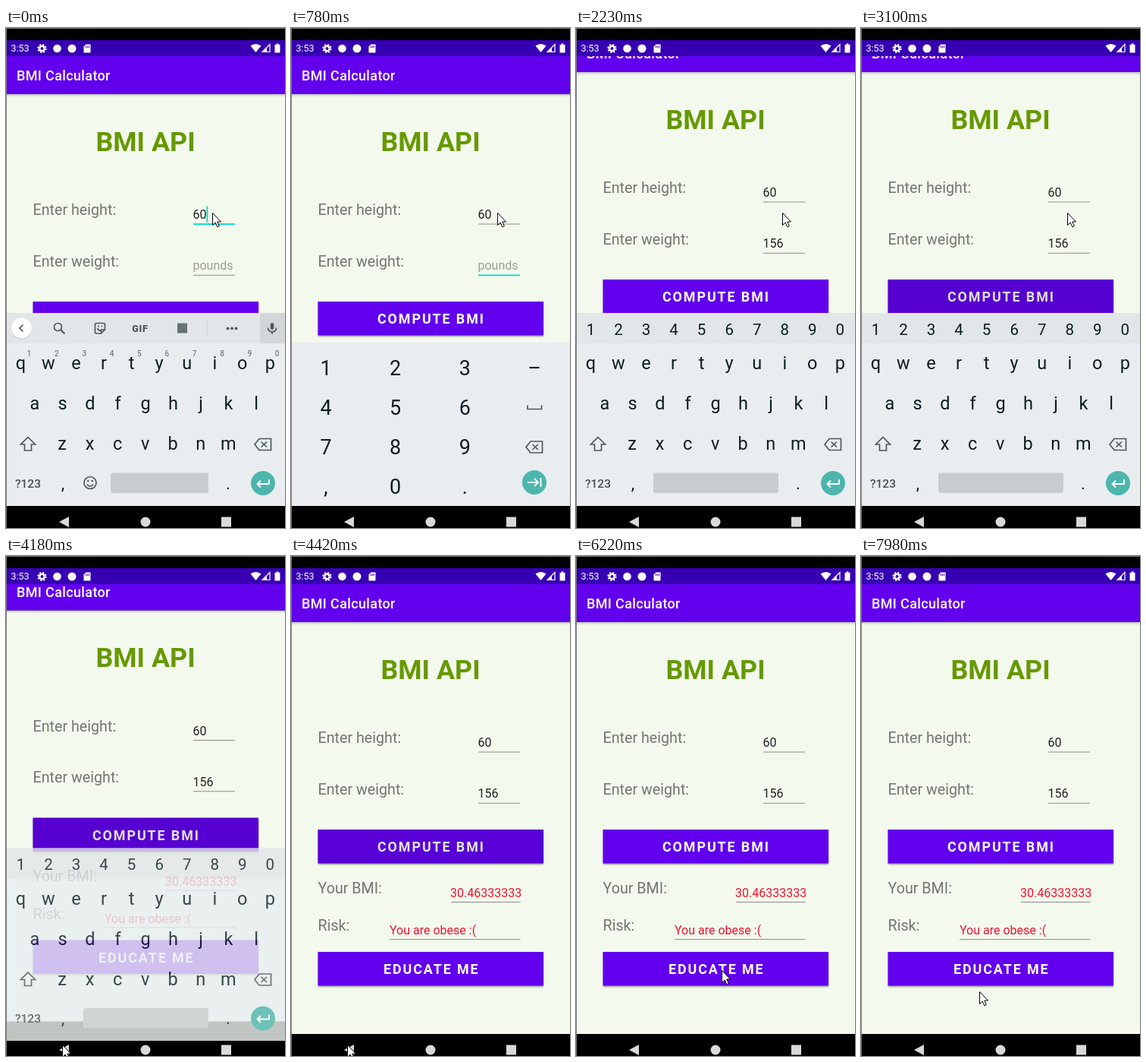
An HTML page for the animation above (8000 ms loop, 368 px wide and 658 px high).

```html
<!DOCTYPE html>
<html lang="en">
<head>
<meta charset="utf-8">
<title>BMI Calculator</title>
<style>
  html, body { margin: 0; width: 100%; height: 100%; overflow: hidden; background: #000; }
  svg { display: block; width: 100vw; height: 100vh; font-family: Roboto, sans-serif; }
  .label { font-size: 19.7px; fill: #757575; }
  .value { font-size: 16px; fill: #222; }
  .red { fill: #ee1530; }
  .button { font-size: 17.9px; font-weight: 700; letter-spacing: 1.9px; fill: #fff; }
  .keys { fill: #0c1d24; text-anchor: middle; }
  .icon { fill: none; stroke: #4d585d; stroke-width: 1.7; }
</style>
</head>
<body>
<svg id="stage" viewBox="0 0 368 658"></svg>
<script>
const text = (x, y, content, attrs = '') => `<text x="${x}" y="${y}" ${attrs}>${content}</text>`;
const rect = (x, y, w, h, fill, attrs = '') =>
  `<rect x="${x}" y="${y}" width="${w}" height="${h}" fill="${fill}" ${attrs}/>`;
const circle = (x, y, r, fill, attrs = '') =>
  `<circle cx="${x}" cy="${y}" r="${r}" fill="${fill}" ${attrs}/>`;
const path = (d, attrs = '') => `<path d="${d}" ${attrs}/>`;
const row = (chars, x, step, y, size) =>
  [...chars].map((c, i) => text(x + step * i, y, c, `font-size="${size}"`)).join('');

const field = (id, y) => `
  ${text(246.5, y, '', `id="${id}Text" class="value"`)}
  ${rect(247, y + 6.5, 55, 1, '#8b8e88', `id="${id}Line"`)}
  ${rect(264, y - 16.5, 1.8, 21, '#03dac5', `id="${id}Caret"`)}`;

const button = (y, label, x, id) => `
  ${rect(36, y + 1.5, 297, 44.5, '#000', `id="${id}Shadow" opacity=".4" filter="url(#blur)"`)}
  ${rect(35.5, y, 297.5, 44.5, '#6200ee')}
  ${text(x, y + 29.3, label, `class="button" id="${id}Label"`)}`;

const backspace = (x, y) => `<g class="icon" transform="translate(${x} ${y})">
  ${path('M-11 0L-5-7.5H10.5V7.5H-5Z')}${path('M-2.5-3.5L5 3.5M5-3.5L-2.5 3.5')}</g>`;

const actionKey = (x, y, arrow) => `<g transform="translate(${x} ${y})">
  ${circle(0, 0, 16, '#4db6ac')}${path(arrow, 'fill="none" stroke="#fff" stroke-width="1.9"')}</g>`;

const app = `<g id="app">
  ${rect(0, 87, 368, 600, '#f3f9ed')}
  ${rect(0, 87, 368, 4, 'url(#fade)')}
  ${rect(0, 20, 368, 67, '#6200ee')}
  ${text(14, 69, 'BMI Calculator', 'fill="#fff" font-size="18" font-weight="500" letter-spacing=".35"')}
  ${text(184, 161.5, 'BMI API', 'fill="#669900" font-size="35.8" font-weight="700" text-anchor="middle"')}
  ${text(35.5, 246, 'Enter height:', 'class="label"')}
  ${text(35.5, 313.5, 'Enter weight:', 'class="label"')}
  ${field('height', 251)}
  ${field('weight', 318.3)}
  ${button(360, 'COMPUTE BMI', 114, 'compute')}
  <g clip-path="url(#buttonClip)">${circle(184, 382, 200, '#000', 'id="ripple"')}</g>
  <g id="results">
    ${text(35.5, 443.7, 'Your BMI:', 'class="label"')}
    ${text(35.5, 493, 'Risk:', 'class="label"')}
    ${text(210, 449, '30.46333333', 'class="value red"')}
    ${rect(211, 455, 91.5, 1, '#8b8e88')}
    ${text(130, 498, 'You are obese :(', 'class="value red"')}
    ${rect(130, 504, 172.5, 1, '#8b8e88')}
    ${button(521, 'EDUCATE ME', 122, 'educate')}
  </g>
</g>`;

const toolbar = `<g id="toolbar">
  ${rect(0, 375, 368, 40, '#e2e6e8')}${rect(335, 375, 33, 40, '#d2d6d9')}
  ${circle(20.5, 395.8, 13.7, '#000', 'opacity=".15"')}${circle(20.5, 395, 13.5, '#fff')}
  ${path('M22.5 390.5L18 395L22.5 399.5', 'class="icon"')}
  <g class="icon">
    ${circle(68.5, 393.5, 5, 'none')}${path('M72 397L77.5 402.5', 'stroke-width="2.2"')}
    ${path('M119 388.5H129Q130.500 388.500 130.500 390V397L125.500 402H119Q117.500 402 117.500 400.500V390Q117.500 388.500 119 388.500ZM125.500 402V397H130.500M120.500 395Q122 399 125 398')}
    ${rect(348.8, 388, 4.4, 9, '#4d585d', 'rx="2.2" stroke="none"')}
    ${path('M345.500 394.500Q345.500 399.800 351 399.800T356.500 394.500M351 400V403')}
  </g>
  ${circle(122, 392.5, 1, '#4d585d')}${circle(126.5, 392.5, 1, '#4d585d')}
  ${text(177, 399.500, 'GIF', 'font-size="12.500" font-weight="900" letter-spacing=".8" fill="#4d585d"')}
  ${rect(226, 388.500, 13, 13, '#68737a')}
  ${rect(264.500, 386, 1, 18, '#c8cdd0')}
  ${[292.500, 298, 303.500].map(x => circle(x, 395.300, 1.900, '#4d585d')).join('')}
  <g fill="#59646a">${row('1234567890', 30.500, 36.350, 431.500, 10)}</g>
  <g class="icon" stroke-width="1.500">${circle(111, 598.500, 8, 'none')}
    ${path('M106.800 600.500Q111 606 115.200 600.500')}</g>
  ${circle(108.200, 596, 1.300, '#4d585d')}${circle(113.800, 596, 1.300, '#4d585d')}
</g>`;

const letters = `<g id="letters">
  ${row('qwertyuiop', 19.400, 36.550, 449, 23.500)}
  ${row('asdfghjkl', 38, 36.500, 502, 23.500)}
  ${row('zxcvbnm', 74, 36.550, 555, 23.500)}
  ${path('M29 538.500L38.500 548H33.500V556H24.500V548H19.500Z', 'class="icon"')}
  ${backspace(339, 548)}
  ${text(29, 604.500, '?123', 'font-size="15.500" font-weight="500" fill="#455056"')}
  ${text(75, 606.500, ',', 'font-size="22"')}${text(293, 606.500, '.', 'font-size="22"')}
  ${rect(138, 585.500, 129, 26.500, '#c8cccf', 'id="space" rx="3"')}
  ${actionKey(339, 599, 'M8-5V1H-7M-3-3.500L-7.500 1L-3 5.500')}
</g>`;

const numberPad = `<g id="numberPad">
  ${['123–', '456', '789', ',0.'].map((r, i) => row(r, 46, 91.700, 457 + 52 * i, 27)).join('')}
  ${path('M312 496.500V501.500H330.500V496.500', 'class="icon"')}
  ${backspace(321, 551.500)}
  ${actionKey(321, 598, 'M-9 0H4M0-5L5 0L0 5M8.500-6V6')}
</g>`;

const statusBar = `
  ${rect(0, 0, 368, 16, '#000')}${rect(0, 16, 368, 21, '#3700b3')}
  <g fill="#fff">
    ${text(6.500, 31, '3:53', 'font-size="12.500"')}
    ${circle(47.500, 27, 3.300, 'none', 'stroke="#fff" stroke-width="2.600"')}
    ${circle(47.500, 27, 5.300, 'none', 'stroke="#fff" stroke-width="1.600" stroke-dasharray="2.200 1.960"')}
    ${circle(67.500, 27, 5.300, '#fff')}${circle(87, 27, 5.500, '#fff')}
    ${path('M105.500 21.500H111.500V32.500H102.500V24.500Z')}
    ${path('M105.500 23.500V26M107.500 23.500V26M109.500 23.500V26', 'stroke="#3700b3"')}
    ${path('M322.500 23.500Q329.500 18.500 336.500 23.500L329.500 32Z')}
    ${path('M338 31.500L348 21.500V31.500Z', 'fill="none" stroke="#fff" stroke-width="1.200"')}
    ${path('M338 32L344 26V32Z')}
    ${path('M354.500 22H356.500V20.500H359.500V22H361.500V32.500H354.500Z')}
  </g>`;

const navIcons = `<g fill="#d9d9d9">
  ${path('M70 650L83 643V657Z')}${circle(184, 650, 6.500, '#d9d9d9')}${rect(284, 643.500, 13, 13, '#d9d9d9')}</g>`;

document.getElementById('stage').innerHTML = `
  <defs>
    <filter id="blur" x="-10%" y="-20%" width="120%" height="150%"><feGaussianBlur stdDeviation="1.300"/></filter>
    <linearGradient id="fade" x2="0" y2="1"><stop stop-opacity=".22"/><stop offset="1" stop-opacity="0"/></linearGradient>
    <clipPath id="buttonClip"><rect x="35.500" y="360" width="297.500" height="44.500"/></clipPath>
  </defs>
  ${app}
  <g id="keyboard" class="keys">
    ${rect(0, 375, 368, 254, '#e9edf0', 'id="keyboardBack"')}
    ${rect(0, 603, 368, 26, '#b5b9b9', 'id="strip"')}
    ${toolbar}
    <g id="digits">${rect(0, 375, 368, 40, '#e2e6e8')}${row('1234567890', 19.400, 36.550, 403.500, 20.500)}</g>
    ${letters}${numberPad}
  </g>
  ${rect(0, 629, 368, 40, '#000', 'id="nav"')}
  ${statusBar}${navIcons}
  ${rect(0, 0, 1, 658, '#777')}${rect(0, 0, 368, 1, '#777')}
  ${path('M.500.500V16.500L4.200 13L6.800 18.800L9.300 17.700L6.800 12H11.500Z', 'id="pointer" fill="#fff" stroke="#000"')}`;

// Each step overrides part of the state from its start time on.
const steps = [
  [0, { keys: 'toolbar', focus: 'height', caret: 1, weight: '', scroll: 0, drop: 0, alpha: 1,
        shade: 0, radius: 200, labelColor: '#fff', results: 0, lift: 0 }],
  [120, { focus: 'weight' }],
  [240, { keys: 'numberPad' }],
  [780, { caret: 0 }],
  [900, { caret: 1, weight: '1' }],
  [1020, { weight: '15' }],
  [1300, { weight: '156' }],
  [1710, { caret: 0 }],
  [1990, { focus: '' }],
  [2110, { keys: 'digits', scroll: -15 }],
  [2230, { scroll: -29 }],
  [2600, { shade: .07, radius: 126 }],
  [2740, { radius: 200 }],
  [3100, { shade: .12 }],
  [4050, { results: 1, drop: 2, alpha: .96 }],
  [4180, { scroll: -15.500, drop: 9.500, alpha: .81 }],
  [4300, { scroll: -2, drop: 20, alpha: .2 }],
  [4420, { scroll: 0, drop: 0, alpha: 0, shade: .1 }],
  [4660, { shade: 0, labelColor: '#e8e4f0' }],
  [6070, { labelColor: '#fff', lift: 1 }],
  [6220, { lift: 0 }],
];
const pointerStops = [
  [0, 272, 243], [3240, 245, 350], [3360, 192, 540], [3480, 162, 632],
  [3650, 130, 640], [3770, 95, 643], [3890, 74, 643],
  [4540, 118, 615], [4660, 171, 580], [4810, 183, 558], [4930, 192, 540],
  [5050, 197, 530], [5310, 194, 542], [5480, 192, 545], [7860, 167, 577], [7980, 156, 573],
];

const el = id => document.getElementById(id);
const set = (id, attrs) => {
  for (const name in attrs) el(id).setAttribute(name, attrs[name]);
};
const show = (id, visible) => set(id, { visibility: visible ? 'visible' : 'hidden' });

function drawField(id, value, state) {
  const focused = state.focus === id, y = id === 'height' ? 257.500 : 324.800;
  el(id + 'Text').textContent = value || 'pounds';
  set(id + 'Text', { style: value ? '' : 'fill:#9b9e98' });
  set(id + 'Line', focused ? { fill: '#03dac5', height: 1.800, y: y - .300 } : { fill: '#8b8e88', height: 1, y });
  set(id + 'Caret', { x: 246.500 + 8.990 * value.length });
  show(id + 'Caret', focused && state.caret);
}

function draw(time) {
  const state = Object.assign({}, ...steps.filter(s => s[0] <= time).map(s => s[1]));
  const [, x, y] = pointerStops.filter(p => p[0] <= time).pop();
  const numeric = state.keys === 'numberPad', top = numeric ? 414 : 375;
  set('pointer', { transform: `translate(${x} ${y})` });
  set('app', { transform: `translate(0 ${state.scroll})` });
  drawField('height', '60', state);
  drawField('weight', state.weight, state);
  set('ripple', { r: state.radius, opacity: state.shade });
  set('computeLabel', { style: `fill:${state.labelColor}` });
  set('results', { opacity: state.results });
  set('educateShadow', { y: state.lift ? 524.500 : 522.500, opacity: state.lift ? .5 : .4 });
  set('keyboard', { transform: `translate(0 ${state.drop})`, opacity: state.alpha });
  set('keyboardBack', { y: top, height: 629 - top });
  for (const id of ['toolbar', 'digits', 'numberPad']) set(id, { display: state.keys === id ? '' : 'none' });
  set('letters', { display: numeric ? 'none' : '' });
  set('space', state.keys === 'digits' ? { x: 102, width: 165 } : { x: 138, width: 129 });
  set('strip', { opacity: state.drop ? 1 : 0 });
  set('nav', { y: 629 + Math.min(state.drop, 9) });
}

const start = performance.now();
function tick() {
  draw((performance.now() - start) % 8000);
  requestAnimationFrame(tick);
}
tick();
</script>
</body>
</html>
```
